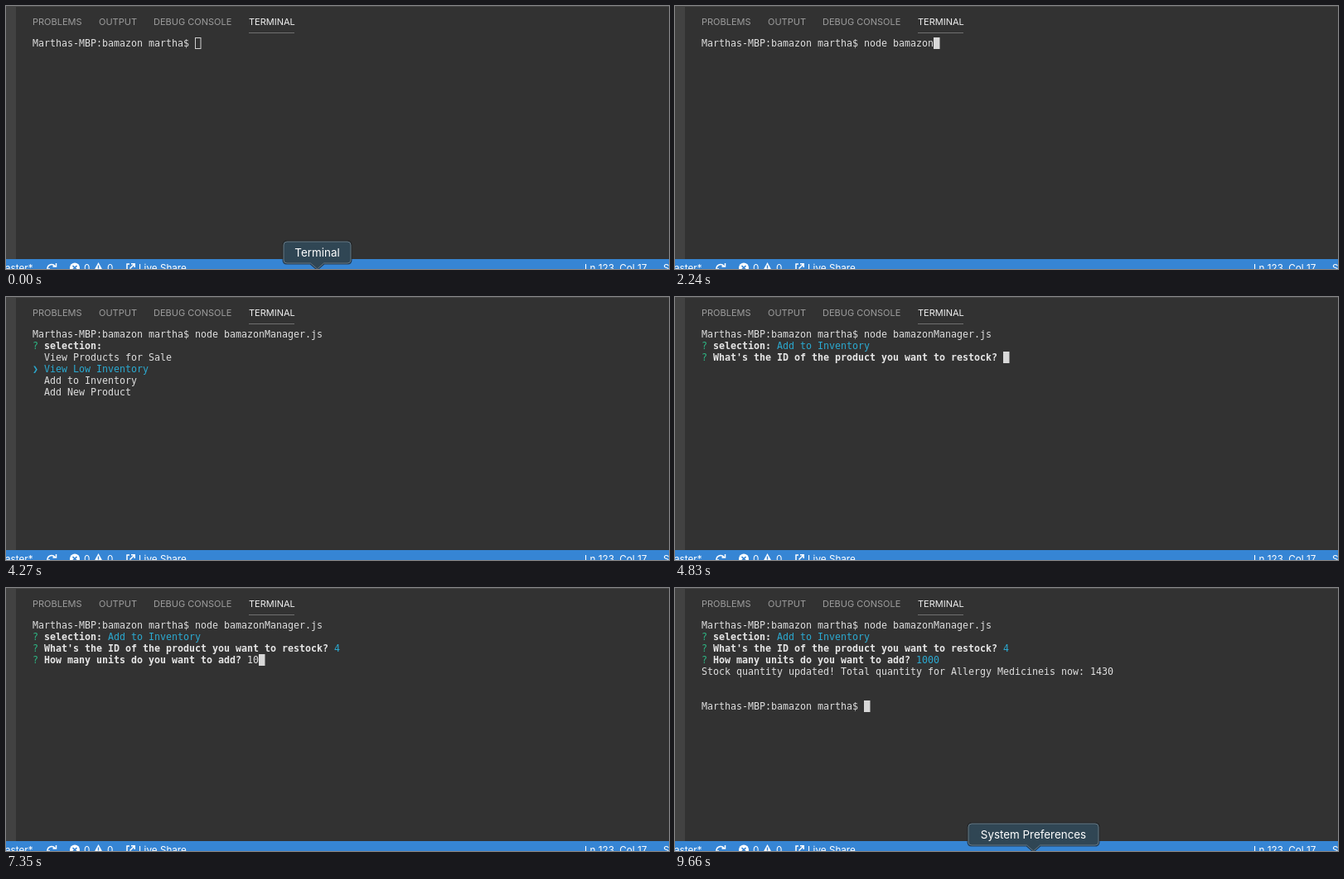
Recreate the animation shown at these times as an HTML page. Size 800x318 px, loop 9730 ms.

```html
<!DOCTYPE html>
<html lang="en">
<head>
<meta charset="utf-8">
<title>Inventory terminal</title>
<style>
  html, body { margin: 0; width: 100%; height: 100%; overflow: hidden; background: #323232; }
  svg { display: block; width: 800px; height: 318px; }
  text { white-space: pre; }
  .ui { font-family: Inter, "Open Sans", sans-serif; }
  .tabs { font-size: 11px; fill: #9d9d9d; }
  .status { font-size: 11.7px; fill: #fff; }
  .tip { font-size: 13.4px; fill: #fff; }
  #screen { font: 11.63px "DejaVu Sans Mono", monospace; fill: #dedede; }
  .bold { font-weight: bold; fill: #e6e6e6; }
  .green { fill: #2db583; }
  .cyan { fill: #2ba9d0; }
  .dim { fill: #8d8d8d; }
  .line { fill: none; stroke: #fff; stroke-width: 1.5; }
</style>
</head>
<body>
<svg viewBox="0 0 800 318">
  <rect width="800" height="318" fill="#323232"/>
  <rect width="12" height="306" fill="#424242"/>
  <rect width="800" height="1" fill="#474747"/>

  <g class="ui tabs">
    <text x="32" y="23">PROBLEMS</text>
    <text x="112" y="23">OUTPUT</text>
    <text x="178" y="23">DEBUG CONSOLE</text>
    <text x="293" y="23" fill="#f0f0f0">TERMINAL</text>
    <rect x="293" y="32" width="55" height="1" fill="#707070"/>
  </g>

  <g id="screen"></g>

  <rect y="306" width="800" height="12" fill="#3685d4"/>
  <g class="ui status">
    <text x="-1" y="321">aster*</text>
    <text x="94" y="321">0</text>
    <text x="122" y="321">0</text>
    <text x="160" y="321">Live Share</text>
    <text x="698" y="321">Ln 123, Col 17</text>
    <text x="793" y="321">Spaces: 4</text>
    <path class="line" d="M50 317a5 5 0 0 1 9-2.5M60.500 311v4h-4M49 318h4"/>
    <circle cx="83" cy="316.500" r="6"/>
    <path d="M80.500 314l5 5m0-5l-5 5" stroke="#3685d4" stroke-width="1.700"/>
    <path d="M111.500 310l6 11h-12z"/>
    <path d="M111.500 313.500v4" stroke="#3685d4" stroke-width="1.500"/>
    <path class="line" d="M149 312h-3v9M151 311.800h4.200v4.200M155 312l-5.500 5.500"/>
  </g>

  <g id="tipA"></g>
  <g id="tipB"></g>
</svg>
<script>
const LOOP = 9730, COL = 7, ROW = 14;
const $ = id => document.getElementById(id);
const PROMPT = 'Marthas-MBP:bamazon martha$ ';
const COMMAND = 'node bamazonManager.js ';
const MENU = ['View Products for Sale', 'View Low Inventory', 'Add to Inventory', 'Add New Product'];
const ASK_ID = "What's the ID of the product you want to restock? ";
const ASK_UNITS = 'How many units do you want to add? ';
const RESULT = 'Stock quantity updated! Total quantity for Allergy Medicineis now: 1430';

// Key press times for the command (a completion follows), then the unit count
const KEYS = [770, 910, 980, 1190, 1260, 1470, 1610, 1750, 1890, 2030, 2170, 2240, 2520];
const DIGITS = [6930, 7280, 7490, 7630];
const AT = { focus: 490, complete: 2800, run: 3010, menu: 3710, down1: 4200, down2: 4480,
  pick: 4690, id: 5250, idSent: 5740, sent: 8050, done: 8190, tip: 9590 };

const passed = (times, t) => times.filter(k => t >= k).length;

function say(row, col, str, cls = '') {
  return `<text class="${cls}" x="${32 + col * COL}" y="${49 + row * ROW}">${str}</text>`;
}

function cursor(row, col, solid = true) {
  const x = 32 + col * COL, y = 38 + row * ROW;
  return solid
    ? `<rect x="${x}" y="${y}" width="7.5" height="14" fill="#d8d8d8"/>`
    : `<rect x="${x + .5}" y="${y + .5}" width="6.5" height="13" fill="none" stroke="#d0d0d0"/>`;
}

const question = (row, str) => say(row, 0, '?', 'green') + say(row, 2, str, 'bold');

function menu(t) {
  const pick = passed([AT.down1, AT.down2], t);
  let out = question(1, 'selection:');
  if (!pick) out += say(1, 13, '(Use arrow keys)', 'dim');
  MENU.forEach((item, i) => {
    const on = i === pick;
    if (on) out += say(2 + i, 0, '❯', 'cyan');
    out += say(2 + i, 2, item, on ? 'cyan' : '');
  });
  return out;
}

function answers(t) {
  const idCol = 2 + ASK_ID.length, unitCol = 2 + ASK_UNITS.length;
  let out = question(1, 'selection:') + say(1, 13, MENU[2], 'cyan') + question(2, ASK_ID);
  if (t < AT.idSent) {
    const typed = t >= AT.id;
    return out + (typed ? say(2, idCol, '4') : '') + cursor(2, idCol + typed);
  }
  const units = '1000'.slice(0, passed(DIGITS, t));
  out += say(2, idCol, '4', 'cyan') + question(3, ASK_UNITS);
  out += say(3, unitCol, units, t < AT.sent ? '' : 'cyan');
  if (t < AT.sent) return out + cursor(3, unitCol + units.length);
  if (t < AT.done) return out + cursor(4, 0);
  return out + say(4, 0, RESULT) + say(7, 0, PROMPT) + cursor(7, PROMPT.length);
}

function screen(t) {
  const typed = t < AT.complete ? COMMAND.slice(0, passed(KEYS, t)) : COMMAND;
  const out = say(0, 0, PROMPT + typed);
  if (t < AT.run) return out + cursor(0, PROMPT.length + typed.length, t >= AT.focus);
  if (t < AT.menu) return out + cursor(1, 0);
  return out + (t < AT.pick ? menu(t) : answers(t));
}

// Dock label: rounded box with a pointer at its bottom centre
function tip(left, right, label) {
  const mid = (left + right) / 2;
  const d = `M${left + 4} 285H${right - 4}q4 0 4 4V307q0 4-4 4H${mid + 8}L${mid} 318L${mid - 8} 311H${left + 4}q-4 0-4-4V289q0-4 4-4z`;
  return `<path d="${d}" fill="none" stroke="#1c2226" stroke-width="3" opacity=".75"/>
    <path d="${d}" fill="#304654" stroke="#667883"/>
    <text class="ui tip" x="${mid}" y="303" text-anchor="middle">${label}</text>`;
}

$('tipA').innerHTML = tip(335, 416, 'Terminal');
$('tipB').innerHTML = tip(354, 511, 'System Preferences');

let last = '';
function draw(t) {
  const next = screen(t);
  if (next !== last) $('screen').innerHTML = last = next;
  $('tipA').setAttribute('opacity', Math.max(0, 1 - Math.floor(t / 70) / 5));
  $('tipB').setAttribute('opacity', t >= AT.tip ? 1 : 0);
}

const start = performance.now();
function tick() {
  draw((performance.now() - start) % LOOP);
  requestAnimationFrame(tick);
}
tick();
</script>
</body>
</html>
```
